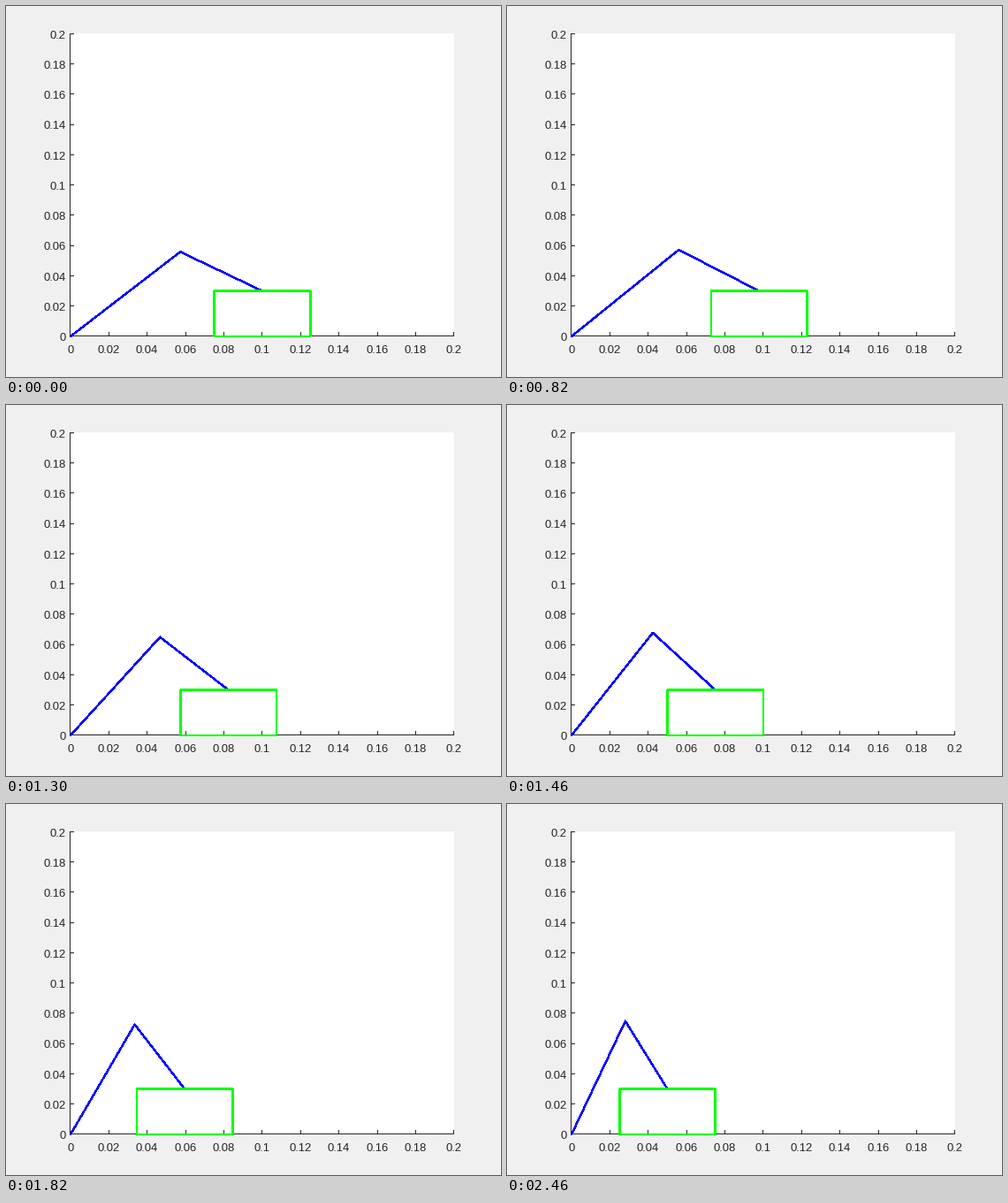
A matplotlib script for the animation above (2500 ms loop, 560 px wide and 420 px high).

```python
import numpy as np
import matplotlib.pyplot as plt
from matplotlib.animation import FuncAnimation
from matplotlib.patches import Rectangle

W, H, DPI = 560, 420, 100
X0, Y0, SPAN_X, SPAN_Y = 73, 374, 434, 342.3   # plot area in pixels
LIMIT = 0.2                                    # both axes run from 0 to LIMIT
L1, L2 = 0.08, 0.05                            # arm link lengths
BOX_W, BOX_H = 0.05, 0.03
START, END, STEPS = 0.1, 0.05, 50
TICK_MS, STEP_MS, HOLD_MS, LOOP_MS = 20, 40, 540, 2500
INK, BLUE, GREEN = "#262626", (0, 0, 255, 255), (0, 255, 0, 255)
STROKE = 2.67
LEFT, RIGHT, TOP, BOTTOM = 70, 350, 240, 380   # region the motion stays in


def px(size):
    """Pixels to points."""
    return size * 72 / DPI


def to_stage(x, y):
    return (X0 + np.asarray(x) / LIMIT * SPAN_X,
            Y0 - np.asarray(y) / LIMIT * SPAN_Y)


def quintic(u):
    return u ** 3 * (10 - 15 * u + 6 * u * u)


def arm(x, y):
    """Joint positions of the two-link arm reaching (x, y), elbow up."""
    r = np.hypot(x, y)
    bend = np.arccos((r * r + L1 * L1 - L2 * L2) / (2 * L1 * r))
    angle = np.arctan2(y, x) + bend
    return [0, L1 * np.cos(angle), x], [0, L1 * np.sin(angle), y]


fig = plt.figure(figsize=(W / DPI, H / DPI), dpi=DPI, facecolor="#f0f0f0")
ax = fig.add_axes([0, 0, 1, 1])


def bar(x, y, w, h, color=INK):
    ax.add_patch(Rectangle((x, y), w, h, fc=color, lw=0))


# Axes: one-pixel rules with inward ticks
bar(72, 31, 435, 343, "white")
bar(72, 31, 1, 343)
bar(72, 373, 435, 1)

font = dict(family="Liberation Sans", size=px(13), color=INK, va="baseline")
for i in range(11):
    label = f"{i * 0.02:.2g}"
    tx, ty = to_stage(i * 0.02, i * 0.02)
    bar(np.floor(tx - 0.2), 369, 1, 5)
    bar(72, np.floor(ty - 0.2), 5, 1)
    ax.text(tx - 0.3, 393, label, ha="center", **font)
    ax.text(68, np.round(ty + 5), label, ha="right", **font)

# The moving strokes are hard-edged, so they are painted on a pixel canvas
gx, gy = np.meshgrid(np.arange(LEFT, RIGHT) + 0.5, np.arange(TOP, BOTTOM) + 0.5)
canvas = np.zeros(gx.shape + (4,), np.uint8)
layer = ax.imshow(canvas, extent=(LEFT, RIGHT, BOTTOM, TOP), aspect="auto",
                  interpolation="nearest", zorder=3)
ax.set_xlim(0, W)
ax.set_ylim(H, 0)
ax.axis("off")


def stroke(xs, ys, color):
    """Paint a polyline with round joins and no smoothing."""
    xs, ys = to_stage(xs, ys)
    for xa, ya, dx, dy in zip(xs, ys, np.diff(xs), np.diff(ys)):
        along = ((gx - xa) * dx + (gy - ya) * dy) / (dx * dx + dy * dy)
        along = np.clip(along, 0, 1)
        gap = np.hypot(gx - xa - along * dx, gy - ya - along * dy)
        canvas[gap < STROKE / 2] = color


def update(i):
    step = max(0, (i * TICK_MS - HOLD_MS) // STEP_MS + 1)
    x = START + (END - START) * quintic((step + 1) / STEPS)
    left, right = x - BOX_W / 2, x + BOX_W / 2
    canvas[:] = 0
    stroke(*arm(x, BOX_H), BLUE)
    stroke([left, right, right, left, left], [0, 0, BOX_H, BOX_H, 0], GREEN)
    layer.set_data(canvas)
    return layer,


anim = FuncAnimation(fig, update, frames=LOOP_MS // TICK_MS,
                     interval=TICK_MS, repeat=True, repeat_delay=0)
plt.show()
```
